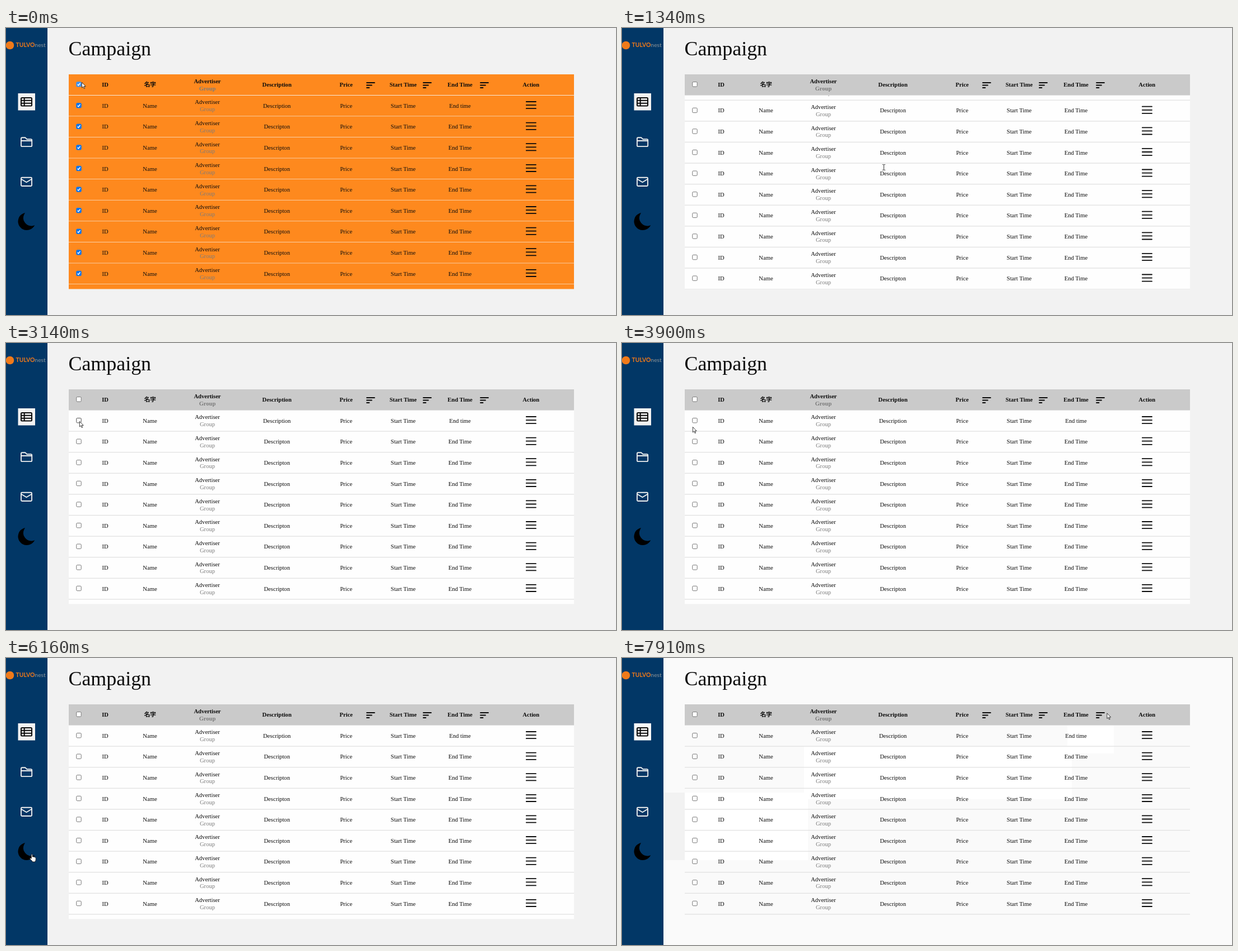
Animation of 1089 by 514 pixels, one loop 8000 ms. Source, as an HTML page:

```html
<!DOCTYPE html>
<html lang="en">
<head>
<meta charset="utf-8">
<title>Campaign</title>
<style>
  html, body { margin: 0; width: 100%; height: 100%; overflow: hidden; }
  svg { display: block; width: 1089px; height: 514px; font: 10.6px "Liberation Serif", serif; }
  svg {
    --page: #f2f2f2; --side: #023766; --head: #cacaca; --row: #fefefe; --line: #e1e1e1;
    --ink: #0c0c0c; --headInk: #0c0c0c; --group: #7c7c7c; --tile: #f2f2f2;
    --mark: #f07a1a; --brandA: #f07a1a; --brandB: #8d9499;
  }
  svg.bright { --page: #fafafa; --row: #fafafa; --tile: #fafafa; }
  svg.dark {
    --page: #212121; --side: #393939; --head: #212121; --row: #393939; --line: #f4f4f4;
    --ink: #fff; --headInk: #a9a9a9; --group: #808080; --tile: #fff;
  }
  svg.pale { --mark: #fff; --brandA: #fff; --brandB: #fff; }
  .mid { text-anchor: middle; }
  .head { font-weight: bold; font-size: 10.55px; fill: var(--headInk); }
  .cell { fill: var(--ink); }
  .group { fill: var(--group); }
  .line { fill: var(--line); }
  .on .line { fill: #f8eadb; }
  .bg { fill: transparent; }
  .on .bg { fill: #fe891e; }
  .box { fill: #fff; stroke: #767676; }
  .tick { fill: none; stroke: none; stroke-width: 1.5; }
  .on .box { fill: #0b75ee; stroke: #0b75ee; }
  .on .tick { stroke: #fff; }
  .hot .box { stroke: #4f4f4f; }
  .on.hot .box { fill: #3f93f2; stroke: #3f93f2; }
  .icon { fill: none; stroke: #eee; stroke-width: 1.9; stroke-linejoin: round; }
  .bars { fill: none; stroke: #0a0a0a; stroke-width: 1.8; stroke-linecap: round; }
  .cur { fill: #fff; stroke: #111; stroke-width: .8; stroke-linejoin: round; }
</style>
</head>
<body>
<svg id="stage" viewBox="0 0 1089 514"></svg>
<script>
const LOOP = 8000, TOP = 120.6, PITCH = 37.6, ROWS = 10;
const COLS = { id: 177, name: 257, adv: 359.5, desc: 483.7, price: 607.3, start: 709, end: 810.5, act: 937.3 };
const stage = document.getElementById('stage');

const rect = (x, y, w, h, attrs = '') => `<rect x="${x}" y="${y}" width="${w}" height="${h}" ${attrs}/>`;
const fill = name => `fill="var(--${name})"`;
const label = (x, y, text, cls) => `<text class="mid ${cls}" x="${x}" y="${y}">${text}</text>`;

const checkbox = y => rect(125.8, y - 4.2, 8.4, 8.4, 'rx="1.5" class="box"') +
  `<path class="tick" d="M127.6 ${y + .2}l1.7 1.8l3.2-4"/>`;

const sortIcon = x => `<path class="bars" stroke-width="2" d="M${x} 98h14M${x} 102.5h9M${x} 107h4.5"/>`;

function header() {
  const names = ['ID', '名字', '', 'Description', 'Price', 'Start Time', 'End Time', 'Action'];
  const xs = Object.values(COLS);
  return `<g id="head">` + rect(112, 83, 902, 37.6, fill('head')) + rect(112, 83, 902, 37.6, 'class="bg"') +
    checkbox(100.8) +
    names.map((n, i) => label(xs[i], 104.8, n, 'head')).join('') +
    label(COLS.adv, 98.9, 'Advertiser', 'head') +
    `<g style="--headInk:var(--hg)">` + label(COLS.adv, 111.5, 'Group', 'head') + '</g>' +
    [644, 745, 847].map(sortIcon).join('') +
    rect(112, TOP - .6, 902, 1, 'class="line"') + '</g>';
}

function row(i) {
  const y = TOP + PITCH * i, base = y + 22.1, c = COLS;
  const cells = [[c.id, 'ID'], [c.name, 'Name'], [c.desc, i ? 'Descripton' : 'Description'],
    [c.price, 'Price'], [c.start, 'Start Time'], [c.end, i ? 'End Time' : 'End time']];
  return `<g id="row${i}">` + rect(112, y, 902, PITCH, 'class="bg"') + checkbox(y + 18.1) +
    cells.map(([x, s]) => label(x, base, s, 'cell')).join('') +
    label(c.adv, y + 15.8, 'Advertiser', 'cell') + label(c.adv, y + 28.6, 'Group', 'group') +
    `<path class="bars" d="M928.8 ${y + 11.4}h17.2m-17.2 6.1h17.2m-17.2 6.1h17.2"/>` +
    rect(112, y + PITCH - .7, 902, 1.3, 'class="line"') + '</g>';
}

const sidebar = rect(0, 0, 74, 514, fill('side')) +
  `<circle cx="7" cy="31" r="7.3" ${fill('mark')}/>
  <text x="17.5" y="34.3" font-family="Lato, sans-serif" font-size="10.4"><tspan font-weight="bold" ${fill('brandA')}>TULVO</tspan><tspan ${fill('brandB')}>nest</tspan></text>` +
  rect(21.5, 117, 30.5, 30.5, fill('tile')) +
  `<g fill="none" stroke="#0a0a0a" stroke-width="2">` + rect(27, 125, 19, 14.5, 'rx="1.5"') +
  `<path d="M27 129.8h19M27 134.7h19M32.7 125v14.5"/></g>
  <path class="icon" d="M27 210.5V198q0-1.8 1.8-1.8h5.4l3 3h7.2q1.8 0 1.8 1.8v9.5q0 1.6-1.8 1.6H28.800q-1.800 0-1.800-1.600zM27 202h19"/>
  <rect class="icon" x="27" y="267.700" width="19" height="15.300" rx="1.500"/>
  <path class="icon" d="M27 270.500l9.500 5.700l9.500-5.700"/>
  <path id="moon" transform="translate(21.500 331.500) scale(1.900)" stroke="#000"
    d="M5.500.650A8 8 0 0 0 14.500 12.300A7.700 7.700 0 1 1 5.500.650Z"/>`.replace(/(\.\d)00/g, '$1');

const cursors = `<g id="cursor">
  <path id="a" class="cur" d="M.4.4V10L2.600 8L4.200 11.600L5.700 11L4.100 7.500H7.200Z"/>
  <path id="i" d="M1 .500h1.800l.7.700l.7-.700H6M3.500 1v9M1 10.500h1.800l.7-.700l.7.700H6" fill="none" stroke="#222" stroke-width=".9"/>
  <path id="h" class="cur" d="M3.200 8.200V1.400q0-1 1-1t1 1V5q2-.8 2.300.4q1.700-.6 2.100.6q1.600-.2 1.600 1.300v3q0 1.600-1 2.700v1H5v-1L1 9q-.8-1.200.2-1.700q.8-.3 2 .9z"/>
</g>`;

stage.innerHTML = `<clipPath id="view">${rect(112, 121, 902, 346.5)}</clipPath>` +
  rect(0, 0, 1089, 514, fill('page')) + rect(74, 241, 38, 121, 'id="p0" fill="#f2f2f2"') +
  `<text x="111.5" y="49" font-size="35.9" ${fill('ink')}>Campaign</text>` +
  rect(112, TOP, 902, 467.5 - TOP, fill('row')) +
  rect(112, 241, 220, 121, 'id="p1" fill="#fff"') +
  rect(325, 158, 478, 95, 'id="p2" fill="#fff"') +
  rect(795, 121, 83, 50, 'id="p3" fill="#fff"') +
  `<g clip-path="url(#view)"><g id="rows">${Array.from({ length: ROWS }, (_, i) => row(i)).join('')}</g></g>` +
  header() + sidebar + cursors;

const el = id => document.getElementById(id);
const rows = Array.from({ length: ROWS }, (_, i) => el('row' + i));

// Pointer stops: time, x, y, shape
const PATH = [
  [0, 135, 97, 'a'], [270, 215, 145, 'a'], [390, 390, 222, 'i'], [510, 464, 244, 'i'],
  [2510, 430, 232, 'i'], [2630, 310, 192, 'a'], [2750, 205, 161, 'a'], [2870, 150, 149, 'a'],
  [2990, 134, 145, 'a'], [3140, 131, 140, 'a'], [3900, 126, 150, 'a'], [4020, 127, 159, 'a'],
  [4140, 129, 168, 'a'], [4260, 130, 173, 'a'], [5230, 108, 226, 'a'], [5350, 77, 291, 'a'],
  [5500, 61, 319, 'a'], [5620, 47, 336, 'h'], [5740, 42, 342, 'h'], [5890, 42, 347, 'h'],
  [6010, 42, 351, 'h'], [6430, 43, 351, 'h'], [6580, 45.5, 350.5, 'h'],
  [7280, 325, 241, 'a'], [7550, 795, 158, 'a'], [7670, 868, 103, 'a'], [7790, 865.5, 98.5, 'a']
];
const SCROLL = [[0, 0], [1070, 8], [1190, 23], [1340, 28.9], [1960, 20], [2110, 4], [2230, 0]];

const at = (steps, t) => steps.filter(s => s[0] <= t).pop();
const within = (t, a, b) => t >= a && t < b;

function draw(t) {
  const dark = within(t, 6280, 7130), bright = t >= 7130;
  const all = t < 150;
  stage.classList.toggle('dark', dark);
  stage.classList.toggle('bright', bright);
  stage.classList.toggle('pale', within(t, 6580, 7130));
  stage.style.setProperty('--hg', dark ? '#8f8f8f' : '#7c7c7c');

  const picked = [all || within(t, 3290, 3900), all || within(t, 4410, 5080)];
  const hot = [within(t, 3140, 3290) || within(t, 3750, 3900), within(t, 4260, 4410) || within(t, 4960, 5080)];
  rows.forEach((r, i) => {
    r.classList.toggle('on', i < 2 ? picked[i] : all);
    r.classList.toggle('hot', !!hot[i]);
  });
  el('head').classList.toggle('on', all);
  el('head').classList.toggle('hot', t < 270);
  el('rows').setAttribute('transform', `translate(0 ${-at(SCROLL, t)[1]})`);
  el('moon').setAttribute('fill', dark ? 'none' : '#000');

  [7280, 7280, 7550, 7670].forEach((from, i) => el('p' + i).setAttribute('visibility', t >= from ? 'visible' : 'hidden'));

  const [, x, y, shape] = at(PATH, t);
  el('cursor').setAttribute('transform', `translate(${x} ${y})`);
  for (const s of 'aih') el(s).setAttribute('visibility', s === shape ? 'visible' : 'hidden');
}

const begin = performance.now();
function tick() {
  draw((performance.now() - begin) % LOOP);
  requestAnimationFrame(tick);
}
draw(0);
requestAnimationFrame(tick);
</script>
</body>
</html>
```
